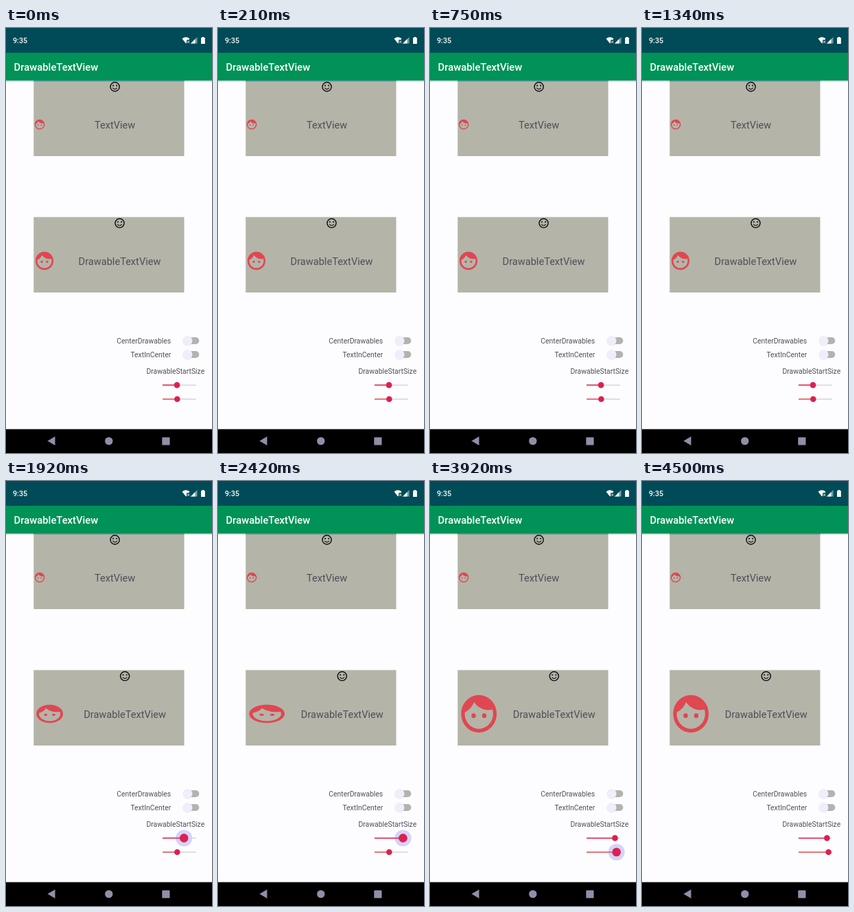
Animation of 300 by 617 pixels, one loop 4580 ms. Source, as an HTML page:

```html
<!DOCTYPE html>
<html lang="en">
<head>
<meta charset="utf-8">
<title>DrawableTextView</title>
<style>
  html, body { margin: 0; width: 100%; height: 100%; overflow: hidden; background: #fdfdff; }
  svg { display: block; width: 300px; height: 617px; font-family: Roboto, sans-serif; }
  .big { font-size: 14.6px; fill: #504e58; text-anchor: middle; }
  .label { font-size: 10.4px; fill: #504f58; text-anchor: end; }
  .bar { font-weight: 500; fill: #fff; }
  .panel { fill: #b5b4a9; }
  .track { stroke-width: 1.5; }
</style>
</head>
<body>
<svg viewBox="0 0 300 617">
  <defs>
    <g id="face" fill="#df4751">
      <path fill-rule="evenodd" d="M12 2C6.48 2 2 6.48 2 12s4.48 10 10 10 10-4.48 10-10S17.52 2 12 2zm0 18c-4.41 0-8-3.59-8-8 0-.29.02-.58.05-.86 2.36-1.05 4.23-2.98 5.21-5.37C11.07 8.33 14.05 10 17.42 10c.78 0 1.53-.09 2.25-.26.21.71.33 1.47.33 2.26 0 4.41-3.59 8-8 8z"/>
      <circle cx="9" cy="13" r="1.25"/>
      <circle cx="15" cy="13" r="1.25"/>
    </g>
    <g id="smile" transform="scale(.73) translate(-12 -12)" fill="#111">
      <circle cx="12" cy="12" r="9" fill="none" stroke="#111" stroke-width="2"/>
      <circle cx="8.5" cy="9.5" r="1.5"/>
      <circle cx="15.5" cy="9.5" r="1.5"/>
      <path d="M12 16c-1.48 0-2.75-.81-3.45-2H6.88c.8 2.05 2.79 3.5 5.12 3.5s4.32-1.45 5.12-3.5h-1.67c-.7 1.19-1.97 2-3.45 2z"/>
    </g>
    <g id="switch">
      <rect x="260" y="-5" width="21.3" height="10" rx="5" fill="#b5b3b0"/>
      <circle cx="264.5" cy=".6" r="7.2" fill="#000" opacity=".08"/>
      <circle cx="264.5" r="7" fill="#efeefb"/>
    </g>
  </defs>

  <rect width="300" height="617" fill="#fdfdff"/>

  <rect class="panel" x="40.3" y="76" width="219.2" height="110"/>
  <use href="#smile" x="158.6" y="85.4"/>
  <use href="#face" transform="translate(40.3 131.2) scale(.73)"/>
  <text class="big" x="158.6" y="145.8">TextView</text>

  <rect class="panel" x="40.3" y="274.5" width="219.2" height="109.5"/>
  <use href="#face" id="bigFace"/>
  <g id="content">
    <use href="#smile" y="283.3"/>
    <text class="big" y="343.8">DrawableTextView</text>
  </g>

  <text class="label" x="240.2" y="457.6">CenterDrawables</text>
  <text class="label" x="240.2" y="477.6">TextInCenter</text>
  <text class="label" x="289.2" y="501.6">DrawableStartSize</text>
  <use href="#switch" y="454"/>
  <use href="#switch" y="474"/>
  <g id="sliders"></g>

  <rect y="76" width="300" height="2" fill="#000" opacity=".14"/>
  <rect x="40.3" y="76" width="219.2" height="1.2" fill="#5b9ab4"/>
  <rect width="300" height="36" fill="#004b57"/>
  <rect y="36" width="300" height="40.3" fill="#009256"/>
  <text class="bar" x="10" y="22" font-size="10.7">9:35</text>
  <text class="bar" x="11.6" y="61.8" font-size="14.8">DrawableTextView</text>

  <g fill="#fff">
    <path d="M256.5 15.5Q262 11 267.5 15.5L266 17.3H263V21.3L262 22.4z"/>
    <path d="M264 18.6l3 3.2m0-3.2l-3 3.2" stroke="#fff"/>
    <path d="M278.5 13V22.5H269z" opacity=".45"/>
    <path d="M275.5 16V22.5H269z"/>
    <path d="M284 14h1.6v-1h2.6v1h1.6v9h-5.8z"/>
  </g>

  <rect y="582.4" width="300" height="35" fill="#000"/>
  <g fill="#908ea8">
    <path d="M60.5 599.5L71.5 593V606z"/>
    <circle cx="149.8" cy="599.6" r="5.7"/>
    <rect x="227.3" y="594.2" width="11.2" height="11.2" rx=".6"/>
  </g>
</svg>
<script>
const LOOP = 4580, LEFT = 228, SPAN = 49, MAX = 73.3, PANEL_X = 40.3, PANEL_W = 219;
const $ = id => document.getElementById(id);
const clamp = v => Math.min(1, Math.max(0, v));

// The thumb moves in two jumps, one every `step` ms from `move` on.
const widthDrag = { down: 1670, move: 1670, step: 250, up: 2630, from: 249, to: 269.4, power: 1 };
const heightDrag = { down: 3130, move: 3250, step: 170, up: 3920, from: 249.3, to: 271.6, power: 2.5 };

function pose(d, t) {
  const p = clamp(Math.floor((t - d.move) / d.step) / 2);
  const fade = clamp((d.up + 160 - t) / 160);
  return {
    x: d.from + (d.to - d.from) * (1 - (1 - p) ** d.power),
    halo: clamp((t - d.down) / 40) * fade,
    grow: clamp((t - d.down) / 250) * fade
  };
}

function set(el, attrs) {
  for (const k in attrs) el.setAttribute(k, attrs[k]);
}

function make(tag, attrs, parent) {
  const el = document.createElementNS('http://www.w3.org/2000/svg', tag);
  set(el, attrs);
  return parent.appendChild(el);
}

function slider(y, color) {
  const g = make('g', { transform: `translate(0 ${y})` }, $('sliders'));
  make('line', { class: 'track', x1: LEFT, x2: LEFT + SPAN, stroke: '#d6d4dc' }, g);
  const halo = make('circle', { r: 12, fill: '#d5d3fa' }, g);
  const fill = make('line', { class: 'track', x1: LEFT, stroke: color }, g);
  const thumb = make('circle', { fill: '#dc2050' }, g);
  return p => {
    set(halo, { cx: p.x, opacity: p.halo });
    set(fill, { x2: p.x });
    set(thumb, { cx: p.x, r: 4.3 + 2 * p.grow });
  };
}

const showWidth = slider(518.4, '#dc2050');
const showHeight = slider(538.7, '#df5450');
const size = x => MAX * (x - LEFT) / SPAN;

function draw(t) {
  const a = pose(widthDrag, t), b = pose(heightDrag, t);
  const w = size(a.x), h = size(b.x);
  showWidth(a);
  showHeight(b);
  set($('bigFace'), { transform: `translate(${PANEL_X} ${338 - h / 2}) scale(${w / 24} ${h / 24})` });
  set($('content'), { transform: `translate(${PANEL_X + (w + PANEL_W) / 2} 0)` });
}

const start = performance.now();
function tick() {
  draw((performance.now() - start) % LOOP);
  requestAnimationFrame(tick);
}
tick();
</script>
</body>
</html>
```
